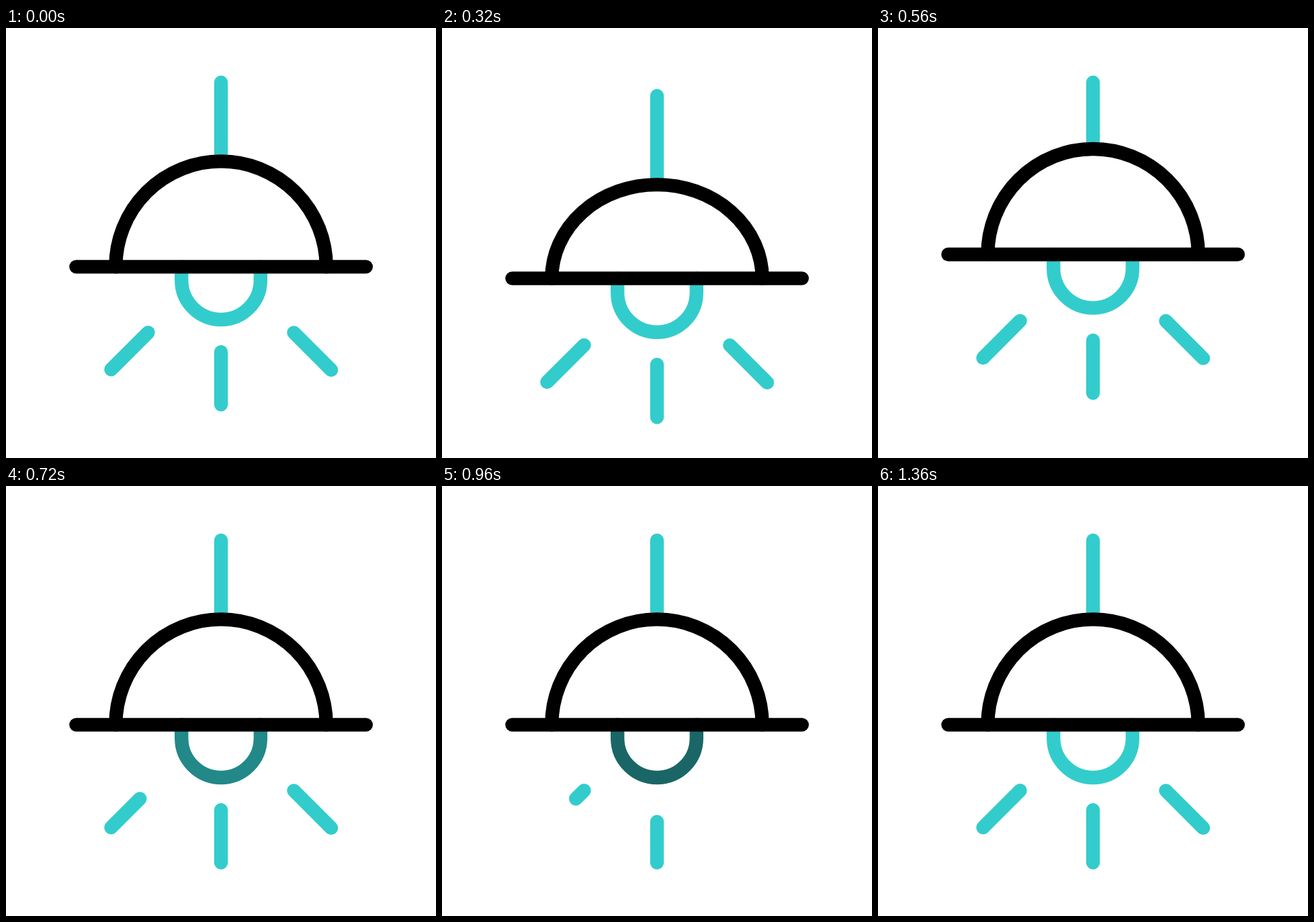
These frames come from a looping animation (640x640 px, 1480 ms). An HTML page with a canvas:

```html
<!DOCTYPE html>
<html>
<head>
<meta charset="utf-8">
<style>
  html, body { margin: 0; overflow: hidden; background: #fff; }
  canvas { display: block; }
</style>
</head>
<body>
<canvas id="stage" width="640" height="640"></canvas>
<script>
const ctx = document.getElementById('stage').getContext('2d');
const STEP = 40, LOOP = 1480, LEG = 5;
const TEAL = [51, 204, 204], DIM = [26, 102, 102];

const mix = (a, b, p) => a + (b - a) * p;
const progress = (t, start) => Math.min(1, Math.max(0, (t - start) / LEG));
const smooth = p => p * p * (3 - 2 * p);

// cubic-bezier(1/6, 1/6, 5/6, 1)
function settle(p) {
  if (p <= 0 || p >= 1) return p;
  const curve = (u, c1, c2) => 3 * u * (1 - u) ** 2 * c1 + 3 * u * u * (1 - u) * c2 + u ** 3;
  let lo = 0, hi = 1;
  for (let i = 0; i < 24; i++) {
    const u = (lo + hi) / 2;
    if (curve(u, 1 / 6, 5 / 6) < p) lo = u; else hi = u;
  }
  return curve(lo, 1 / 6, 1);
}

// Rest, dip, rebound, rest
function bounce(t, low, high) {
  if (t < 7) return low * smooth(progress(t, 2));
  if (t < 12) return mix(low, high, smooth(progress(t, 7)));
  return high * (1 - smooth(progress(t, 12)));
}

function stroke(color, path) {
  ctx.strokeStyle = color;
  ctx.beginPath();
  path();
  ctx.stroke();
}

function line(color, x1, y1, x2, y2) {
  stroke(color, () => { ctx.moveTo(x1, y1); ctx.lineTo(x2, y2); });
}

const rgb = c => `rgb(${c.map(Math.round)})`;
const teal = rgb(TEAL);

// Each ray wipes away from its inner end, then grows back from there
function ray(t, start, dy, x1, y1, x2, y2) {
  const grown = settle(progress(t, start + 6));
  const from = grown > 0 ? 0 : settle(progress(t, start));
  const to = grown > 0 ? grown : 1;
  if (from >= 1) return;
  line(teal, mix(x1, x2, from), mix(y1, y2, from) + dy,
             mix(x1, x2, to), mix(y1, y2, to) + dy);
}

function draw(t) {
  ctx.fillStyle = '#fff';
  ctx.fillRect(0, 0, 640, 640);
  ctx.lineWidth = 20.4;
  ctx.lineCap = 'round';

  const base = 355.4 + bounce(t, 22.5, -28.4);
  const glow = bounce(t, 24, -26.8);
  const height = 157 - bounce(t, 19.6, 0);

  line(teal, 320, 81 + bounce(t, 22.3, 0), 320, base - height);

  const dim = settle(progress(t, 15)) - settle(progress(t, 29));
  stroke(rgb(TEAL.map((c, i) => mix(c, DIM[i], dim))), () => {
    ctx.moveTo(261.2, base);
    ctx.arc(320, 375.2 + glow, 58.8, Math.PI, 0, true);
    ctx.lineTo(378.8, base);
  });

  ray(t, 17, glow, 211.5, 453.2, 156.4, 508.3);
  ray(t, 23, glow, 320, 482.3, 320, 560.6);
  ray(t, 19, glow, 428.4, 453.4, 484, 509);

  stroke('#000', () => ctx.ellipse(320, base, 156.7, height, 0, Math.PI, 2 * Math.PI));
  line('#000', 104.4, base, 535.8, base);
}

function tick() {
  draw(Math.floor(performance.now() % LOOP / STEP));
  requestAnimationFrame(tick);
}
tick();
</script>
</body>
</html>
```
